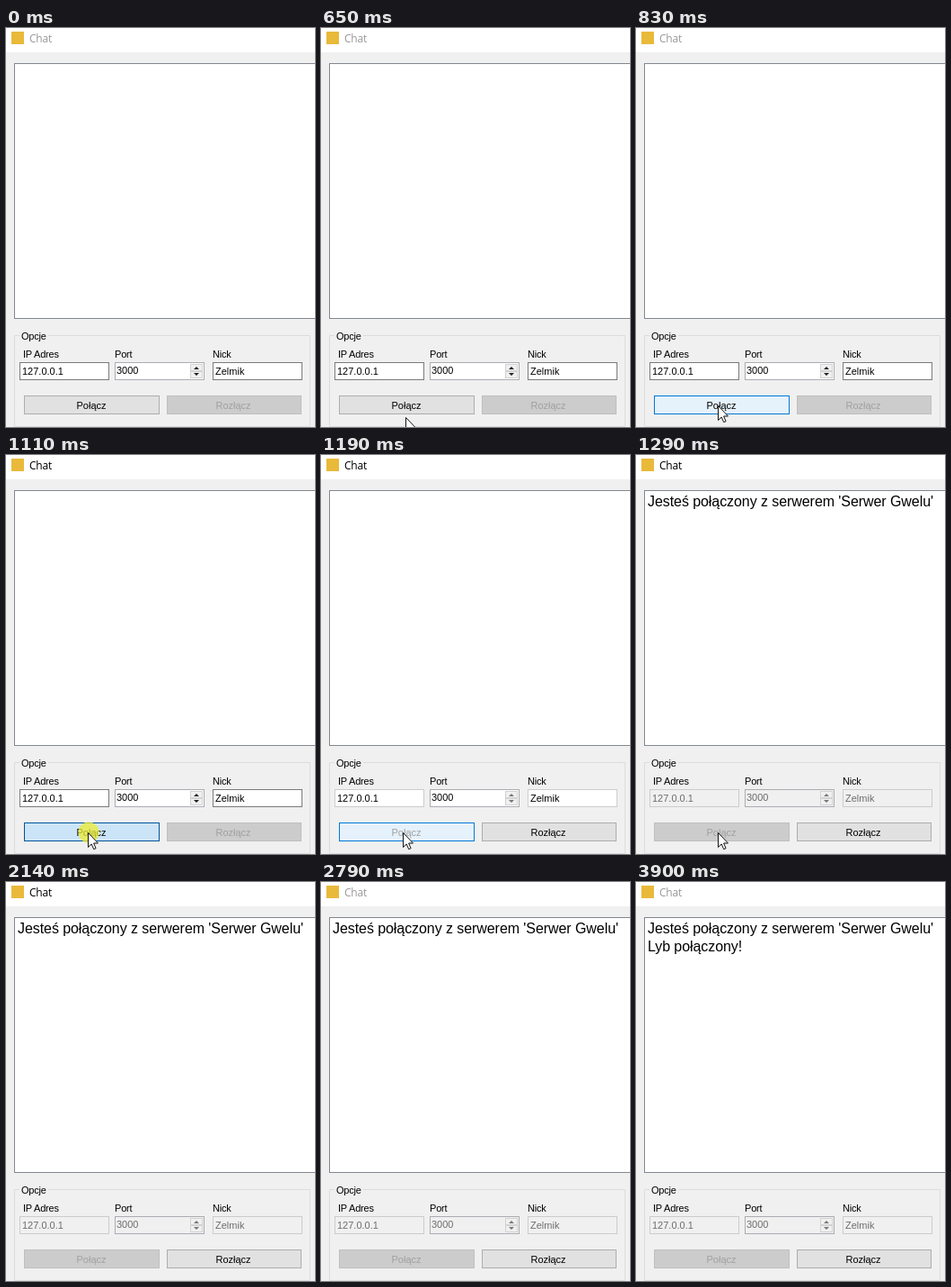
These frames come from a looping animation (344 by 443 pixels, 8 s). An HTML page:

```html
<!DOCTYPE html>
<html lang="pl">
<head>
<meta charset="utf-8">
<title>Chat</title>
<style>
  html, body { margin: 0; width: 100%; height: 100%; overflow: hidden; background: #f0f0f0; }
  svg { display: block; width: 100%; height: 100%; }
  text { font: 11px "Liberation Sans", Arial, sans-serif; fill: #000; white-space: pre; }
  .title { font: 12px "Open Sans", "Noto Sans", sans-serif; letter-spacing: -.2px; }
  .log { font-size: 16px; letter-spacing: -.07px; }
  .mid { text-anchor: middle; }
  .tight { letter-spacing: -.2px; }
  .field { fill: #fff; stroke: #7a7a7a; }
  .button { fill: #e1e1e1; stroke: #adadad; }
  .spin { fill: #f0f0f0; stroke: #d2d2d2; }
</style>
</head>
<body>
<svg viewBox="0 0 344 443">
  <rect width="344" height="443" fill="#f0f0f0"/>
  <rect width="344" height="27" fill="#fff"/>
  <rect x="6" y="4" width="14" height="14" fill="#e9b93a"/>
  <text id="title" class="title" x="26" y="16">Chat</text>

  <rect x="9.5" y="39.5" width="400" height="283" fill="#fff" stroke="#828790"/>
  <text id="joined" class="log" x="13" y="57">Jesteś połączony z serwerem 'Serwer Gwelu'</text>
  <text id="guest" class="log" x="13" y="77">Lyb połączony!</text>

  <path d="M15 341.5H9.5V442.5H338.5V341.5H47" fill="none" stroke="#dcdcdc"/>
  <text class="tight" x="17" y="346">Opcje</text>
  <text class="tight" x="19" y="366">IP Adres</text>
  <text class="tight" x="121" y="366">Port</text>
  <text class="tight" x="230" y="366">Nick</text>

  <rect id="ipBox" class="field" x="15.5" y="371.5" width="99" height="19"/>
  <text id="ip" x="18" y="385">127.0.0.1</text>
  <rect id="portBox" class="field" x="121.5" y="371.5" width="99" height="19" style="stroke:#abadb3"/>
  <text id="port" x="123" y="384">3000</text>
  <rect class="spin" x="205.5" y="373.5" width="13" height="7"/>
  <rect class="spin" x="205.5" y="381.5" width="13" height="7"/>
  <path id="arrows" d="M209 379h6l-3-3zM209 383h6l-3 3z"/>
  <rect id="nickBox" class="field" x="230.5" y="371.5" width="99" height="19"/>
  <text id="nick" x="233" y="385">Zelmik</text>

  <rect id="connect" class="button" x="20.5" y="408.5" width="150" height="20"/>
  <text id="connectText" class="mid" x="95" y="423">Połącz</text>
  <rect id="leave" class="button" x="179.5" y="408.5" width="149" height="20"/>
  <text id="leaveText" class="mid" x="253" y="423">Rozłącz</text>

  <circle id="click" cx="92" cy="419" r="11.5" fill="#ecec30" opacity=".75"/>
  <path id="cursor" d="M.5 .5V16.5L4.2 13 6.7 18.7 9.1 17.7 6.6 12H11.5Z" fill="#fff" stroke="#111"/>
</svg>
<script>
const LOOP = 8000;
const HOVER = 650, SETTLE = 740, READY = 830, PRESS = 1110, RELEASE = 1190,
      ONLINE = 1290, AWAY = 2140, BLUR = 2790, GUEST = 3900;

// Each row holds a time and the value kept from then on.
function hold(id, prop, rows) {
  const frames = rows.map(([time, value]) =>
    ({ offset: time / LOOP, [prop]: value, easing: 'step-end' }));
  frames.push({ ...frames.at(-1), offset: 1 });
  document.getElementById(id).animate(frames, { duration: LOOP, iterations: Infinity });
}

function show(id, from, to = LOOP, value = 1) {
  const rows = [[0, 0], [from, value]];
  if (to < LOOP) rows.push([to, 0]);
  hold(id, 'opacity', rows);
}

const at = (x, y) => `translate(${x}px, ${y}px)`;

hold('title', 'fill', [[0, '#999'], [PRESS, '#000'], [BLUR, '#999']]);
show('joined', ONLINE);
show('guest', GUEST);

for (const id of ['ip', 'port', 'nick']) {
  hold(id, 'fill', [[0, '#000'], [ONLINE, '#6d6d6d']]);
  hold(id + 'Box', 'fill', [[0, '#fff'], [ONLINE, '#f0f0f0']]);
}
for (const id of ['ipBox', 'nickBox'])
  hold(id, 'stroke', [[0, '#7a7a7a'], [RELEASE, '#ccc']]);
hold('arrows', 'fill', [[0, '#222'], [RELEASE, '#777']]);

hold('connect', 'fill', [[0, '#e1e1e1'], [SETTLE, '#e3e9ee'], [READY, '#e5f1fb'],
  [PRESS, '#cce4f7'], [RELEASE, '#e5f1fb'], [ONLINE, '#ccc']]);
hold('connect', 'stroke', [[0, '#adadad'], [SETTLE, '#579fc2'], [READY, '#0078d7'],
  [PRESS, '#005499'], [RELEASE, '#0078d7'], [ONLINE, '#bfbfbf']]);
hold('connectText', 'fill', [[0, '#000'], [RELEASE, '#a0a0a0']]);
hold('leave', 'fill', [[0, '#ccc'], [RELEASE, '#e1e1e1']]);
hold('leave', 'stroke', [[0, '#bfbfbf'], [RELEASE, '#adadad']]);
hold('leaveText', 'fill', [[0, '#a0a0a0'], [RELEASE, '#000']]);

show('click', PRESS, RELEASE, .75);
show('cursor', HOVER, AWAY);
hold('cursor', 'transform', [[0, at(94, 432)], [SETTLE, at(92, 421)], [READY, at(91, 419)]]);
</script>
</body>
</html>
```
